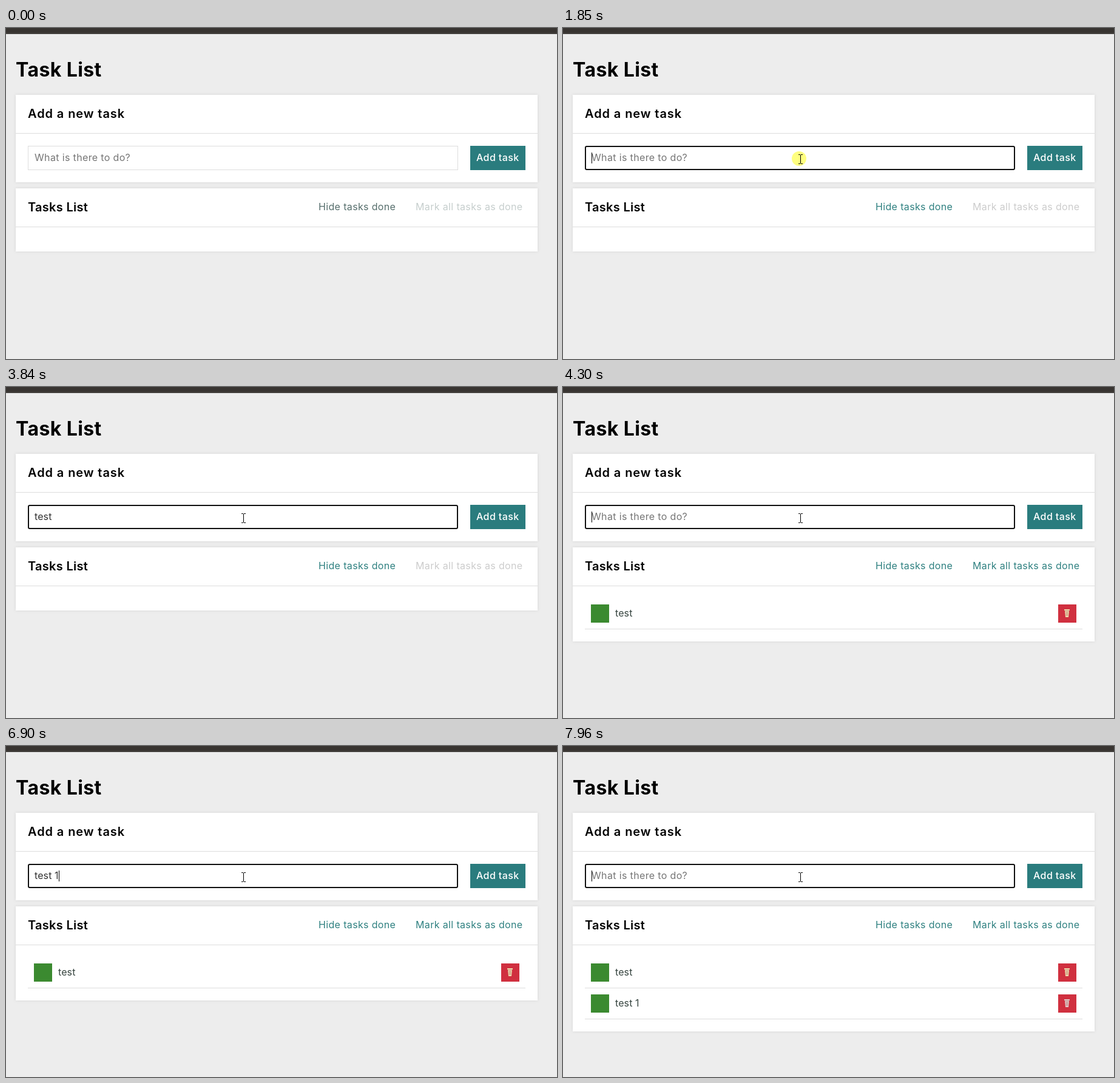
An HTML page that plays this animation: 908 px wide and 545 px high, repeating every 8 s.

```html
<!DOCTYPE html>
<html lang="en">
<head>
<meta charset="utf-8">
<title>Task List</title>
<style>
  html, body { margin: 0; width: 100%; height: 100%; overflow: hidden; background: #ededed; }
  svg { display: block; width: 908px; height: 545px; }
  text { font: 400 16px Montserrat, Inter, sans-serif; letter-spacing: .35px; white-space: pre; }
  .title { font-size: 32px; font-weight: 700; letter-spacing: .4px; }
  .head { font-size: 20px; font-weight: 600; letter-spacing: .3px; }
  .wide { letter-spacing: .9px; }
  .button { fill: #fff; font-weight: 500; letter-spacing: .4px; }
  .entry { letter-spacing: .1px; fill: #333; }
  .card { fill: #fff; filter: drop-shadow(0 0 2px #d4d4d4); }
  .line { fill: #ddd; }
  .off { display: none; }
</style>
</head>
<body>
<svg viewBox="0 0 908 545">
  <defs>
    <linearGradient id="bar" x2="0" y2="1">
      <stop offset=".7" stop-color="#383431"/>
      <stop offset="1" stop-color="#474441"/>
    </linearGradient>
  </defs>
  <rect width="908" height="545" fill="#ededed"/>
  <rect width="908" height="10" fill="url(#bar)"/>
  <text class="title" x="16" y="80">Task List</text>

  <rect class="card" x="16" y="110" width="860" height="144"/>
  <text class="head wide" x="36" y="148">Add a new task</text>
  <rect class="line" x="16" y="173" width="860" height="1"/>
  <rect id="field" fill="#fff"/>
  <text id="hint" x="47" y="219" fill="#757575">What is there to do?</text>
  <text id="typed" class="entry" x="47" y="219"></text>
  <rect id="caret" y="205" width="1" height="18"/>
  <rect x="765" y="194" width="91" height="40" fill="#2a7c7e"/>
  <text class="button" x="775" y="219">Add task</text>

  <rect id="list" class="card" x="16" y="264" width="860" height="104"/>
  <text class="head" x="36" y="302">Tasks List</text>
  <text id="hide" x="515" y="300">Hide tasks done</text>
  <text id="mark" x="675" y="300">Mark all tasks as done</text>
  <rect class="line" x="16" y="327" width="860" height="1"/>
  <g id="rows"></g>

  <circle id="click" cx="389" cy="215" r="12" fill="#ffff80"/>
  <path id="beam" fill="none" stroke="#000"
    d="M388 208.5h3M392 208.5h3M391.5 209v14M388 223.5h3M392 223.5h3"/>
  <path id="arrow" fill="#fff" stroke="#000" stroke-width=".9"
    d="M.5 .5v16l3.7-3.5 2.4 5.6 2.4-1-2.4-5.5h5z"/>
</svg>
<script>
const LOOP = 8000, TEAL = '#2f8080';
const $ = id => document.getElementById(id);
const set = (el, attrs) => Object.entries(attrs).forEach(([k, v]) => el.setAttribute(k, v));
const show = (el, on) => el.classList.toggle('off', !on);

// Caret position after each typed character
const caretX = [47, 53, 62, 70, 77, 82, 87];

// Each step changes part of the state from its time on
const steps = [
  [0, { text: '', caret: false, focus: false, click: false, rows: 0 }],
  [1850, { focus: true, caret: true, click: true }],
  [1910, { click: false }],
  [2370, { caret: false }],
  [2710, { text: 't', caret: true }],
  [2840, { text: 'te' }],
  [3040, { text: 'tes' }],
  [3240, { text: 'test' }],
  [3840, { caret: false }],
  [4300, { text: '', caret: true, rows: 1 }],
  [4830, { caret: false }],
  [5370, { caret: true }],
  [5470, { text: 't' }],
  [5570, { text: 'te' }],
  [5770, { text: 'tes' }],
  [6240, { text: 'test' }],
  [6440, { text: 'test ' }],
  [6900, { text: 'test 1' }],
  [7100, { text: '', rows: 2 }],
  [7430, { caret: false }],
  [7960, { caret: true }]
];

const row = (label, y, icon) => `<g class="off" transform="translate(0 ${y})">
  <rect x="46" y="10" width="30" height="30" fill="#3b8a30"/>
  <text class="entry" x="86" y="30" style="fill:#36443f">${label}</text>
  <rect x="816" y="10" width="30" height="30" fill="#d0303f"/>
  <path d="M826 18h9v2h-1l-1 11h-5l-1-11h-1z" fill="${icon}"/>
  <path d="M827 20.5h7M829.5 22v7M831.5 22v7" stroke="#a5574f" stroke-width=".6"/>
  <rect class="line" x="36" y="50" width="820" height="1"/>
</g>`;
$('rows').innerHTML = row('test', 348, '#efd9ad') + row('test 1', 399, '#e3c9c9');

function drawPointer(t) {
  const u = Math.min(6, Math.floor((t - 130) / 65)) / 6;
  const left = (1 - u) ** 2;
  const x = 391 + 290 * left, y = 216 + 201 * left;
  const inField = y < 234;
  show($('arrow'), t >= 130 && !inField);
  show($('beam'), t >= 130 && inField);
  set($('arrow'), { transform: `translate(${Math.round(x)} ${Math.round(y)})` });
  set($('beam'), { transform: `translate(${Math.round(x - 391)} ${Math.round(y - 216)})` });
}

function draw(t) {
  const s = Object.assign({}, ...steps.filter(([at]) => at <= t).map(([, change]) => change));
  set($('field'), s.focus
    ? { x: 37, y: 195, width: 707, height: 38, rx: 2, stroke: '#101010', 'stroke-width': 2 }
    : { x: 36.5, y: 194.5, width: 708, height: 39, rx: 0, stroke: '#ddd', 'stroke-width': 1 });
  $('typed').textContent = s.text;
  show($('hint'), !s.text);
  show($('caret'), s.caret);
  show($('click'), s.click);
  set($('caret'), { x: caretX[s.text.length] });
  set($('hide'), { fill: s.focus ? TEAL : '#566e6c' });
  set($('mark'), { fill: s.rows ? TEAL : s.focus ? '#ccc' : '#c6cecd' });
  set($('list'), { height: s.rows ? 104 + 51 * s.rows : 104 });
  [...$('rows').children].forEach((el, i) => show(el, i < s.rows));
  drawPointer(t);
}

const start = performance.now();
function tick() {
  draw((performance.now() - start) % LOOP);
  requestAnimationFrame(tick);
}
tick();
</script>
</body>
</html>
```
